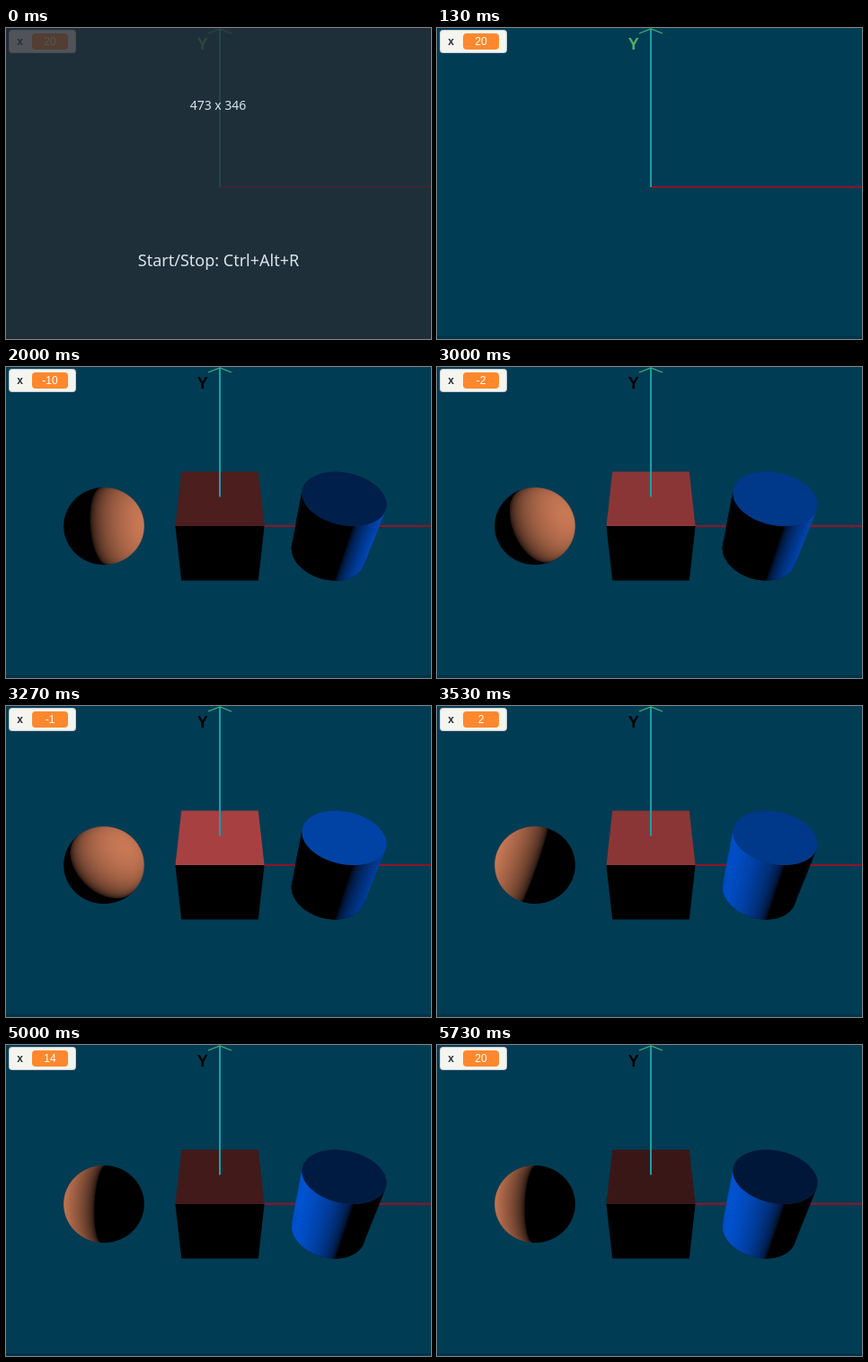
Animation of 473x346 px, one loop 7740 ms. Source, as an HTML page with a canvas:

```html
<!DOCTYPE html>
<html lang="en">
<head>
<meta charset="utf-8">
<title>Moving light</title>
<style>
html, body { margin: 0; width: 100%; height: 100%; overflow: hidden; background: #003c54; }
canvas { display: block; }
</style>
</head>
<body>
<canvas id="stage" width="473" height="346"></canvas>
<script>
const W = 473, H = 346, LOOP = 7740;
const ctx = document.getElementById('stage').getContext('2d');
const SANS = '"Liberation Sans", Arial, sans-serif';
const NOTO = '"Noto Sans", sans-serif';

// Camera looks down at 45 degrees
const FOCAL = 444, DIST = 5.19, CX = 238, CY = 177, S = Math.SQRT1_2;
function project(x, y, z) {
  const k = FOCAL / (DIST - (y + z) * S);
  return [CX + x * k, CY - (y - z) * S * k];
}

// [time, light x]
const KEYS = [[1000, -20], [2000, -10], [2940, -2], [3200, -1], [3530, 2], [4330, 9], [5730, 20]];
function lightX(t) {
  if (t < KEYS[0][0]) return 20;
  for (let i = 1; i < KEYS.length; i++) {
    const [t0, x0] = KEYS[i - 1], [t1, x1] = KEYS[i];
    if (t < t1) return Math.floor(x0 + (x1 - x0) * (t - t0) / (t1 - t0) + 1e-6);
  }
  return 20;
}

function shade(rgb, lambert, power) {
  const k = Math.pow(Math.max(0, lambert), power);
  return rgb.map(c => Math.round(c * k));
}
const css = rgb => `rgb(${rgb.join(',')})`;

function polygon(points, fill) {
  ctx.beginPath();
  points.forEach(p => ctx.lineTo(p[0], p[1]));
  ctx.closePath();
  ctx.fillStyle = fill;
  ctx.fill();
}
function line(points, color, width) {
  ctx.beginPath();
  points.forEach(p => ctx.lineTo(p[0], p[1]));
  ctx.strokeStyle = color;
  ctx.lineWidth = width;
  ctx.stroke();
}
function text(str, x, y, font, color, align = 'center') {
  ctx.font = font;
  ctx.textAlign = align;
  ctx.fillStyle = color;
  ctx.fillText(str, x, y);
}
function box(x, y, w, h, r, fill) {
  ctx.beginPath();
  ctx.roundRect(x, y, w, h, r);
  ctx.fillStyle = fill;
  ctx.fill();
}

const ball = document.createElement('canvas');
ball.width = 94;
ball.height = 90;
const ballCtx = ball.getContext('2d');

function drawSphere(light) {
  const [lx, ly] = light;
  // Light in the frame of the sphere as the camera sees it
  const lr = 0.961 * lx - 0.197 * ly, lu = S * ly, lv = 0.278 * lx + 0.68 * ly;
  const img = ballCtx.createImageData(ball.width, ball.height);
  for (let j = 0, o = 0; j < ball.height; j++) {
    for (let i = 0; i < ball.width; i++, o += 4) {
      const nx = (i + 0.5 - 47) / 44.8, ny = (45 - j - 0.5) / 43;
      const rho = Math.hypot(nx, ny);
      const cover = Math.min(1, Math.max(0, (1 - rho) * 44 + 0.5));
      if (!cover) continue;
      const nz = Math.sqrt(Math.max(0, 1 - rho * rho));
      img.data.set(shade([200, 120, 85], nx * lr + ny * lu + nz * lv, 0.45), o);
      img.data[o + 3] = 255 * cover;
    }
  }
  ballCtx.putImageData(img, 0, 0);
  ctx.drawImage(ball, 62, 132);
}

function drawCube(light) {
  const a = project(-0.5, 0.5, 0.5), b = project(0.5, 0.5, 0.5);
  polygon([a, b, project(0.5, -0.5, 0.5), project(-0.5, -0.5, 0.5)], '#000');
  polygon([project(-0.5, 0.5, -0.5), project(0.5, 0.5, -0.5), b, a],
    css(shade([192, 75, 75], light[1], 0.4)));
}

function drawCylinder(light) {
  const N = 144, rim = (i, y) => {
    const a = i / N * 2 * Math.PI;
    return project(1.5 + 0.5 * Math.cos(a), y, 0.5 * Math.sin(a));
  };
  const ring = y => Array.from({ length: N }, (_, i) => rim(i, y));
  polygon(ring(-0.5), '#000');
  for (let i = -N / 4; i < 3 * N / 4; i++) {
    const a = (i + 0.5) / N * 2 * Math.PI, c = Math.cos(a), s = Math.sin(a);
    if (3.67 * s - 1.5 * c < 0.5 - 0.1) continue;
    const col = css(shade([0, 84, 212], c * light[0], 0.45));
    // Overlap the next strip to hide seams
    polygon([rim(i, 0.5), rim(i + 1.6, 0.5), rim(i + 1.6, -0.5), rim(i, -0.5)], col);
  }
  polygon(ring(0.5), css(shade([0, 77, 190], light[1], 0.4)));
}

function drawMonitor(value) {
  box(3, 2, 75, 26, 4, '#c3ccd3');
  box(4, 3, 73, 24, 3, '#f4f5ef');
  text('x', 15.5, 19, `bold 12px ${SANS}`, '#2b2d38');
  box(29, 6, 40, 18, 4, '#ff882e');
  text(value, 49, 19, `12px ${SANS}`, '#fff');
}

function draw(t) {
  const solid = t >= 1000, x = lightX(t), n = Math.hypot(x, 1);
  const light = [-x / n, 1 / n];
  ctx.fillStyle = '#003c54';
  ctx.fillRect(0, 0, W, H);
  ctx.fillStyle = '#00344a';
  ctx.fillRect(0, 343, W, 3);

  line([[CX, 177], [W, 177]], '#8c1426', 2);
  if (solid) {
    drawSphere(light);
    drawCube(light);
    drawCylinder(light);
  }
  line([[CX, solid ? 144.5 : 177], [CX, 1]], '#1b9fa9', 2);
  line([[225, 6], [CX, 1], [251, 6]], '#38b878', 1.3);
  text('Y', 218.7, 24, `bold 18px ${SANS}`, solid ? '#000' : '#4fb065');
  drawMonitor(x);

  if (t < 130) {
    ctx.fillStyle = 'rgba(39,44,52,0.8)';
    ctx.fillRect(0, 0, W, H);
    text('473 x 346', 236, 91, `14px ${NOTO}`, '#dbe4e8');
    text('Start/Stop: Ctrl+Alt+R', 236.5, 265, `18px ${NOTO}`, '#dbe4e8');
  }
}

const start = performance.now();
function tick() {
  draw((performance.now() - start) % LOOP);
  requestAnimationFrame(tick);
}
tick();
</script>
</body>
</html>
```
